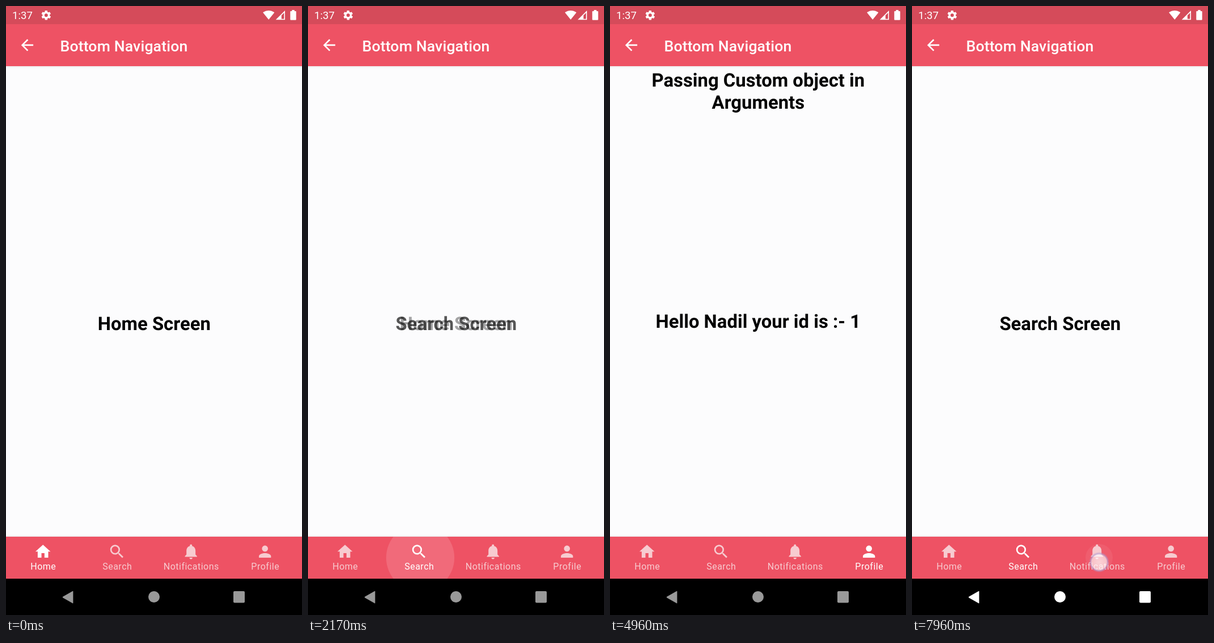
Recreate the animation shown at these times as an HTML page. Size 522x1073 px, loop 8 s.

```html
<!DOCTYPE html>
<html lang="en">
<head>
<meta charset="utf-8">
<title>Bottom Navigation</title>
<style>
  html, body { margin: 0; width: 100%; height: 100%; overflow: hidden; background: #000; }
  svg { display: block; width: 100%; height: 100%; font-family: Roboto, sans-serif; }
  .page { font-size: 32.85px; font-weight: 700; fill: #000; text-anchor: middle; text-rendering: geometricPrecision; }
  .title { font-size: 26.6px; font-weight: 500; letter-spacing: .15px; }
  .label { font-size: 16px; letter-spacing: .5px; text-anchor: middle; }
</style>
</head>
<body>
<svg viewBox="0 0 522 1073">
  <defs>
    <linearGradient id="shade" x1="0" y1="0" x2="0" y2="1">
      <stop offset="0" stop-color="#000" stop-opacity=".06"/>
      <stop offset="1" stop-color="#000" stop-opacity="0"/>
    </linearGradient>
    <radialGradient id="spot">
      <stop offset="0" stop-color="#fff" stop-opacity=".72"/>
      <stop offset=".72" stop-color="#fff" stop-opacity=".62"/>
      <stop offset=".82" stop-color="#b9a3d6" stop-opacity=".75"/>
      <stop offset="1" stop-color="#a58bc0" stop-opacity="0"/>
    </radialGradient>
    <clipPath id="barClip"><rect y="935" width="522" height="74"/></clipPath>
  </defs>

  <rect width="522" height="1073" fill="#fcfcfd"/>
  <g id="pages"></g>

  <rect y="106" width="522" height="4" fill="url(#shade)"/>
  <rect width="522" height="106" fill="#ee5264"/>
  <rect width="522" height="32" fill="#d54b5a"/>

  <g fill="#fff">
    <text x="11" y="23" font-size="18.6">1:37</text>
    <path transform="translate(60.4 5.8) scale(.87)" fill-rule="evenodd" d="M19.1 12.9a7 7 0 0 0 0-1.8l2-1.6a.5.5 0 0 0 .1-.6l-1.9-3.3a.5.5 0 0 0-.6-.2l-2.4 1a7 7 0 0 0-1.6-1l-.4-2.5a.5.5 0 0 0-.5-.4h-3.8a.5.5 0 0 0-.5.4l-.4 2.5a7 7 0 0 0-1.6 1l-2.4-1a.5.5 0 0 0-.6.2L2.7 8.9a.5.5 0 0 0 .1.6l2 1.6a7 7 0 0 0 0 1.8l-2 1.6a.5.5 0 0 0-.1.6l1.9 3.3c.1.2.4.3.6.2l2.4-1a7 7 0 0 0 1.6 1l.4 2.5c0 .2.2.4.5.4h3.8c.3 0 .5-.2.5-.4l.4-2.5a7 7 0 0 0 1.6-1l2.4 1c.2.1.5 0 .6-.2l1.9-3.3a.5.5 0 0 0-.1-.6zM12 15.4a3.4 3.4 0 1 1 0-6.8 3.4 3.4 0 0 1 0 6.8z"/>
    <path transform="translate(452.8 5.4) scale(.87)" d="M12 21.5L23.6 7C23.2 6.7 18.7 3 12 3S.8 6.7.4 7z"/>
    <path fill-rule="evenodd" d="M492 8V24.3H475.7zM490.4 12L485.8 16.5V22.7H490.4z"/>
    <path d="M504.3 7h4.4v2h2q1 0 1 1v13.7q0 1-1 1h-8.4q-1 0-1-1V10q0-1 1-1h2z"/>
    <path transform="translate(21.5 53) scale(1.329)" d="M20 11H7.83l5.59-5.59L12 4l-8 8 8 8 1.41-1.41L7.83 13H20z"/>
    <text class="title" x="95.5" y="79.7">Bottom Navigation</text>
  </g>

  <rect y="932" width="522" height="3" fill="url(#shade)" transform="matrix(1 0 0 -1 0 1867)"/>
  <rect y="935" width="522" height="74" fill="#ee5264"/>
  <circle id="ripple" fill="#fff" clip-path="url(#barClip)"/>
  <g id="tabs"></g>

  <rect y="1009" width="522" height="64" fill="#000"/>
  <ellipse id="backGlow" cx="109" cy="1041" ry="30" fill="#fff"/>
  <g id="systemKeys">
    <path d="M118.4 1031.4v20.4q0 1-1 .5l-17.2-9.9q-1-.8 0-1.6l17.2-9.9q1-.5 1 .5z"/>
    <circle cx="261" cy="1041" r="10"/>
    <rect x="401" y="1031" width="20" height="20.5" rx="2"/>
  </g>
  <circle id="touch" r="18" fill="url(#spot)"/>
</svg>

<script>
  const LOOP = 8000, FADE = 220;
  const HOME = 0, SEARCH = 1, ALERTS = 2, PROFILE = 3;

  const tabs = [
    ["Home", "M10 20v-6h4v6h5v-8h3L12 3 2 12h3v8z"],
    ["Search", "M15.5 14h-.79l-.28-.27A6.47 6.47 0 0 0 16 9.5 6.5 6.5 0 1 0 9.5 16c1.61 0 3.09-.59 4.23-1.57l.27.28v.79l5 4.99L20.49 19zM9.5 14a4.5 4.5 0 1 1 0-9 4.5 4.5 0 0 1 0 9z"],
    ["Notifications", "M12 22c1.1 0 2-.9 2-2h-4c0 1.1.9 2 2 2zM18 16v-5c0-3.07-1.64-5.64-4.5-6.32V4a1.5 1.5 0 0 0-3 0v.68C7.63 5.36 6 7.92 6 11v5l-2 2v1h16v-1z"],
    ["Profile", "M12 12a4 4 0 1 0 0-8 4 4 0 0 0 0 8zM12 14c-2.67 0-8 1.34-8 4v2h16v-2c0-2.66-5.33-4-8-4z"]
  ];

  // Each page is a list of [baseline, text].
  const pages = [
    [[571, "Home Screen"]],
    [[571, "Search Screen"]],
    [[141.5, "Passing Integer in Arguments"], [529.5, "You have 145 unread notifications"]],
    [[141.5, "Passing Custom object in"], [180.5, "Arguments"], [566.5, "Hello Nadil your id is :- 1"]]
  ];

  const visits = [
    { at: 0, page: HOME },
    { at: 2080, page: SEARCH },
    { at: 3480, page: ALERTS },
    { at: 4420, page: PROFILE },
    { at: 5640, page: HOME },
    { at: 7080, page: SEARCH }
  ];

  const taps = [
    { at: 1960, x: 198, y: 980 },
    { at: 3360, x: 328, y: 980 },
    { at: 4300, x: 458, y: 980 },
    { at: 5520, x: 109, y: 1041, system: true },
    { at: 6960, x: 198, y: 980 },
    { at: 7920, x: 330, y: 980 }
  ];

  const byId = id => document.getElementById(id);
  const clamp = v => Math.min(1, Math.max(0, v));
  const easeOut = v => 1 - (1 - clamp(v)) ** 2;
  const tabX = i => 65.25 + 130.5 * i;

  function set(el, attrs) {
    for (const key in attrs) el.setAttribute(key, attrs[key]);
    return el;
  }

  function add(parent, tag, attrs, text = "") {
    const el = set(document.createElementNS("http://www.w3.org/2000/svg", tag), attrs);
    el.textContent = text;
    return parent.appendChild(el);
  }

  const tabEls = tabs.map(([name, icon], i) => {
    const group = add(byId("tabs"), "g", { fill: "#fff" });
    add(group, "path", { d: icon, transform: `translate(${tabX(i) - 16} 945.3) scale(1.329)` });
    add(group, "text", { class: "label", x: tabX(i) + .5, y: 993.3 }, name);
    return group;
  });

  const pageEls = pages.map(lines => {
    const group = add(byId("pages"), "g", { class: "page" });
    for (const [y, text] of lines) add(group, "text", { x: 261.3, y }, text);
    return group;
  });

  function drawPages(t) {
    const index = visits.findLastIndex(v => v.at <= t);
    const { at, page } = visits[index];
    const shown = index ? easeOut((t - at) / FADE) : 1;
    const previous = index ? visits[index - 1].page : page;
    pageEls.forEach((el, i) =>
      set(el, { opacity: i === page ? shown : i === previous ? 1 - shown : 0 }));
    tabEls.forEach((el, i) => set(el, { fill: i === page ? "#fff" : "#f7cbd0" }));
  }

  function drawTouch(t) {
    const tap = taps.findLast(p => p.at <= t);
    const age = tap ? t - tap.at : LOOP;
    const { x, y, system } = tap || taps[0];
    const glow = .14 * clamp(age / 90) * clamp((520 - age) / 300);
    const spread = easeOut(age / 300);
    set(byId("touch"), { cx: x, cy: y, opacity: clamp((170 - age) / 50) });
    set(byId("ripple"), { cx: x, cy: 972, r: 10 + 55 * spread, opacity: system ? 0 : glow });
    set(byId("backGlow"), { rx: 20 + 30 * spread, opacity: system ? glow : 0 });
  }

  function draw(t) {
    drawPages(t);
    drawTouch(t);
    const level = Math.round(153 + 102 * clamp((t - 5560) / 350));
    set(byId("systemKeys"), { fill: `rgb(${level},${level},${level})` });
  }

  const start = performance.now();
  function tick() {
    draw((performance.now() - start) % LOOP);
    requestAnimationFrame(tick);
  }
  tick();
</script>
</body>
</html>
```
